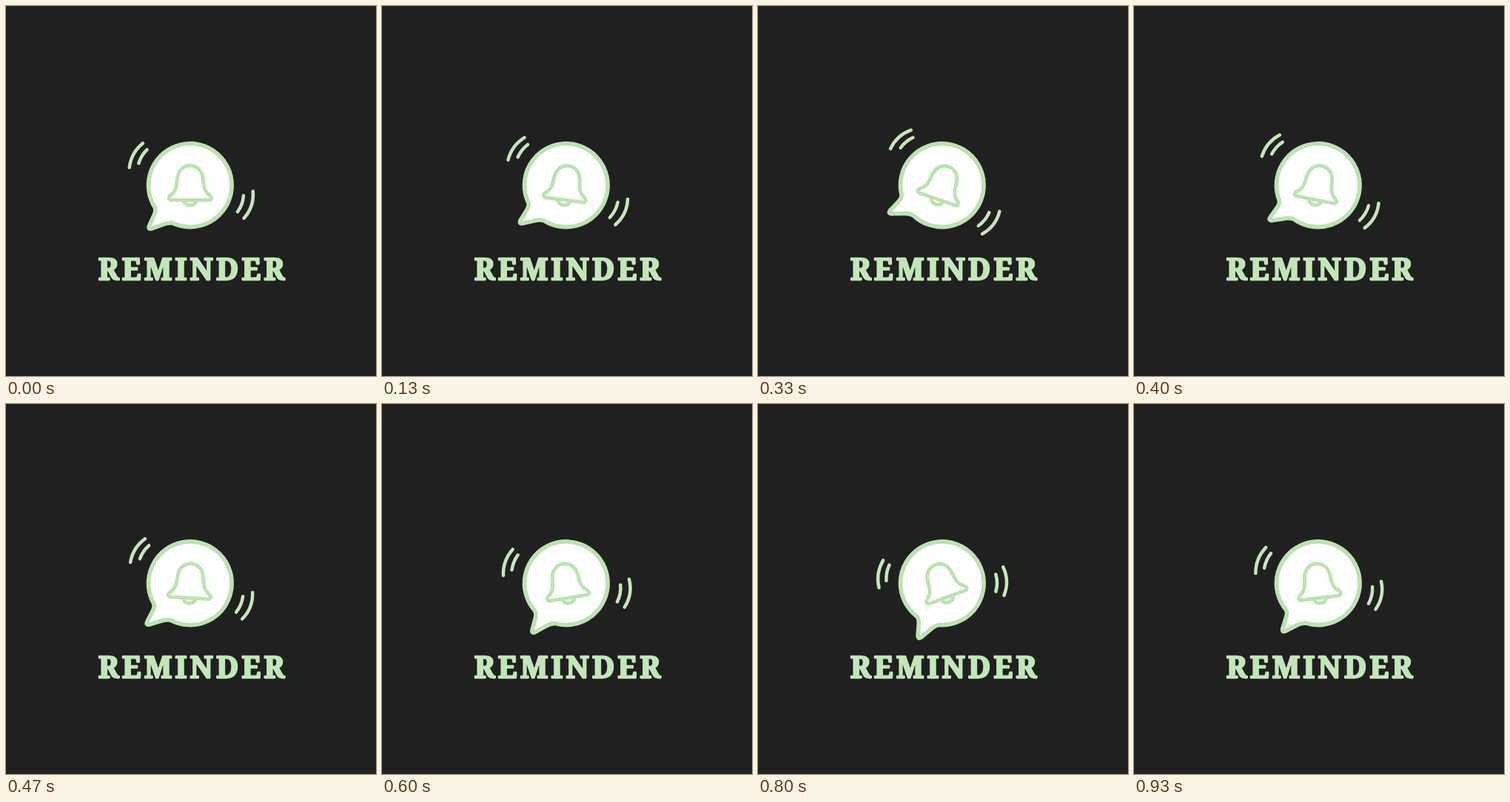
Recreate the animation shown at these times as an HTML page. Size 500 by 500 pixels, loop 0.99 s.

```html
<!DOCTYPE html>
<html lang="en">
<head>
<meta charset="utf-8">
<title>Reminder</title>
<style>
  html, body { margin: 0; width: 100%; height: 100%; overflow: hidden; background: #202020; }
  svg { display: block; width: 100%; height: 100%; }
  .line { fill: none; stroke: #bfe1b4; stroke-linecap: round; stroke-linejoin: round; }
  #waves { stroke: #c6e5bc; }
  text { font: 900 39.5px "Noto Serif", serif; letter-spacing: 4.2px; fill: #c3e6b9; stroke: #c3e6b9; stroke-width: 2.3; stroke-linejoin: round; }
</style>
</head>
<body>
<svg viewBox="0 0 500 500">
  <g id="bubble">
    <path class="line" style="fill:#fff" stroke-width="5.7"
      d="M-47.5 30.300Q-46 34-48.500 40L-55.300 55Q-57 59.800-52 58.600L-37 53.200Q-31 50.500-24 51A56.300 56.300 0 1 0-47.500 30.300Z"/>
    <g class="line" stroke-width="5">
      <path d="M-26 20H26.500Q31 18 27 14C19 8 18.500 3 17.500-8C16.500-20 9-26.500 0-26.500C-9-26.500-16.500-20-17.500-8C-18.500 3-19 8-27 14Q-31 18-26 20Z"/>
      <path d="M-8 22A8.200 6.500 0 0 0 8 22"/>
    </g>
    <path id="waves" class="line" stroke-width="4.500"/>
  </g>
  <text x="252.600" y="370" text-anchor="middle">REMINDER</text>
</svg>
<script>
  const LOOP = 990;
  const angles = [0, 7.2, 14, 19.6, 24, 19, 11, 3, -3, -9.2, -15.5, -21.5, -20.4, -14, -7.2];
  const bubble = document.getElementById('bubble');

  const polar = (r, deg) => {
    const a = deg * Math.PI / 180;
    return `${r * Math.cos(a)} ${r * Math.sin(a)}`;
  };
  const wave = (r, from, to, bend) => `M${polar(r, from)}A${bend} ${bend} 0 0 1 ${polar(r, to)}`;

  document.getElementById('waves').setAttribute('d',
    wave(85.5, 196.3, 221.6, 50) + wave(75.5, 203, 219.5, 44) +
    wave(85.3, 5.5, 31.5, 48) + wave(73.5, 11, 29.2, 42));

  function draw() {
    const step = Math.floor(performance.now() % LOOP / (LOOP / angles.length));
    bubble.setAttribute('transform', `translate(248.8 242.2) rotate(${angles[step]})`);
    requestAnimationFrame(draw);
  }
  draw();
</script>
</body>
</html>
```
